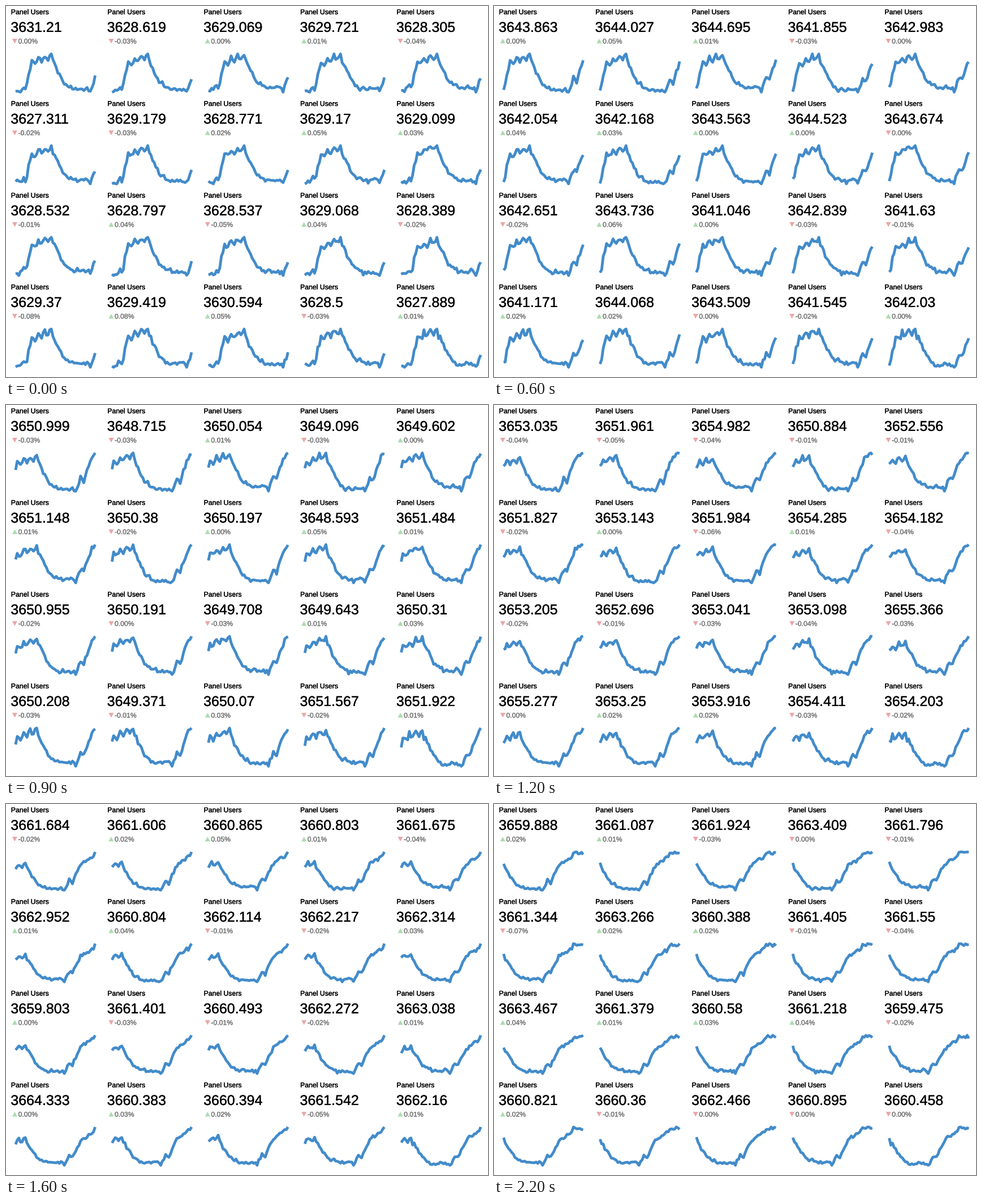
A matplotlib script that plays this animation: 852x657 px, repeating every 2.3 s.

```python
import matplotlib.pyplot as plt
import numpy as np
from matplotlib.animation import FuncAnimation
from matplotlib.patheffects import withStroke

W, H, DPI = 852, 657, 72          # at 72 dpi one point is one pixel
COLS, ROWS = 5, 4
CELL_W, CELL_H = 170.4, 162.4
FRAMES, WINDOW = 23, 50
BLUE, RED, GREEN, GRAY = "#428bca", "#eaa6a5", "#abdcae", "#777777"
LEFT, RIGHT, TOP, BOTTOM = 17, 157.6, 84.8, 152.6

# Daily cycle of user counts: (sample, level), level 1 being the first peak
FLOOR, SPAN = 3617, 33
CYCLE = [
    (0, .03), (3, .04), (5, .15), (6, .09), (7, .2), (8, .47), (10, .74),
    (14, .83), (18, .89), (22, .95), (23, .82), (25, .64), (27, .49),
    (29, .29), (33, .16), (36, .09), (45, .09), (46, .01), (47, .12),
    (49, .37), (51, .29), (53, .58), (56, .9), (59, 1.03), (64, 1.22),
    (65, 1.36), (71, 1.36),
]


def make_series(rng):
    """One noisy cycle per panel; the plateau has a regular ripple."""
    t = np.arange(FRAMES + WINDOW - 1)
    level = np.interp(t, *zip(*CYCLE))
    plateau = (t >= 9) & (t <= 22)
    level = level + .06 * plateau * np.cos(np.pi / 2 * (t - 10))
    return FLOOR + SPAN * level + rng.normal(0, 1, (COLS * ROWS, len(t)))


plt.rcParams["font.family"] = "Liberation Sans"
plt.rcParams["text.hinting"] = "none"

rng = np.random.default_rng(7)
series = make_series(rng)
changes = rng.normal(0, .03, (FRAMES, COLS * ROWS))

fig = plt.figure(figsize=(W / DPI, H / DPI), dpi=DPI, facecolor="white")
ax = fig.add_axes([0, 0, 1, 1])
ax.set(xlim=(0, W), ylim=(H, 0))
ax.axis("off")


class Panel:
    def __init__(self, index):
        self.index = index
        row, col = divmod(index, COLS)
        self.x, self.y = col * CELL_W, row * CELL_H
        self.text(8.8, 14.6, 12.3, "black", "Panel Users")
        self.value = self.text(8.3, 45.8, 25, "black")
        self.change = self.text(21.6, 66.4, 12.2, GRAY)
        self.arrow, = ax.fill([0, 0, 0], [0, 0, 0], lw=0)
        xs = self.x + np.linspace(LEFT, RIGHT, WINDOW)
        self.line, = ax.plot(xs, xs * 0, color=BLUE, lw=4.8,
                             solid_capstyle="butt", solid_joinstyle="round")

    def text(self, x, y, size, color, content=""):
        return ax.text(self.x + x, self.y + y, content, size=size, color=color,
                       ha="left", va="baseline",
                       path_effects=[withStroke(linewidth=.3, foreground=color)])

    def show(self, step):
        data = series[self.index, step:step + WINDOW]
        level = (data - data.min()) / np.ptp(data)
        self.line.set_ydata(self.y + BOTTOM - level * (BOTTOM - TOP))
        self.value.set_text(str(round(float(data[-1]), 3)))

        change = changes[step, self.index]
        self.change.set_text(f"{change:.2f}%".replace("-0.00", "0.00"))
        up = change > 0
        tip, foot = (57.8, 66.2) if up else (66.4, 58)
        corners = [(11, foot), (20, foot), (15.5, tip)]
        self.arrow.set_xy([(self.x + x, self.y + y) for x, y in corners])
        self.arrow.set_facecolor(GREEN if up else RED)


panels = [Panel(i) for i in range(COLS * ROWS)]


def update(step):
    for panel in panels:
        panel.show(step)
    return []


anim = FuncAnimation(fig, update, frames=FRAMES, interval=100,
                     repeat=True, repeat_delay=0)
plt.show()
```
